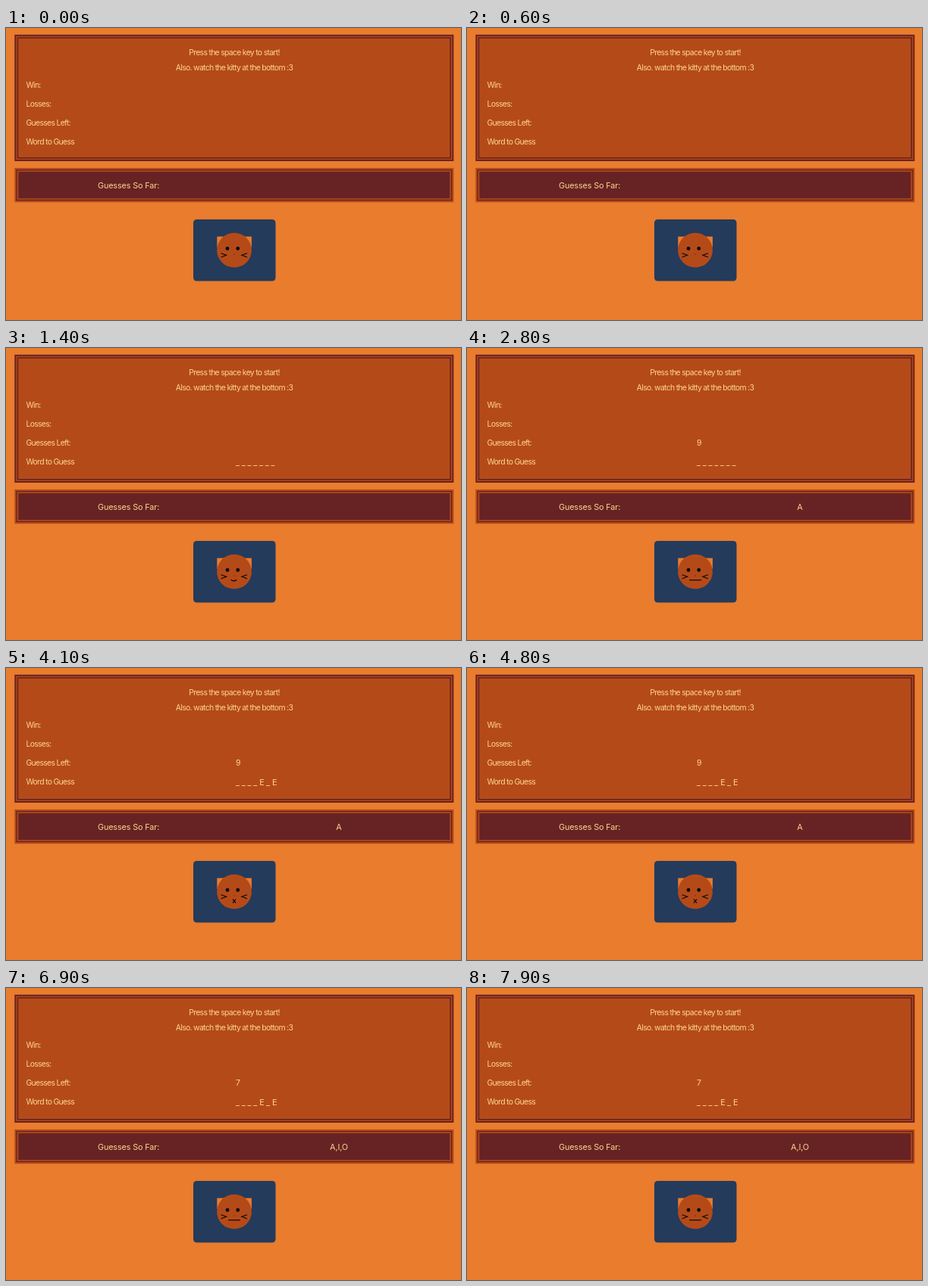
Write an HTML page that moves like this. It is 600 px wide and 386 px high and loops after 8000 ms.

```html
<!DOCTYPE html>
<html lang="en">
<head>
<meta charset="utf-8">
<title>Kitty word game</title>
<style>
  html, body { margin: 0; width: 100%; height: 100%; overflow: hidden; background: #e97c2d; }
  svg { display: block; width: 600px; height: 386px; }
  text { font: 10.4px Inter, sans-serif; letter-spacing: -.68px; fill: #fcd68c; }
  .mid { text-anchor: middle; }
  .wide { font-size: 10.8px; letter-spacing: -.12px; }
  .rust { fill: #b54a19; }
  .wine { fill: #672324; }
  .ink { fill: none; stroke: #0b0808; stroke-width: 1.2; }
</style>
</head>
<body>
<svg viewBox="0 0 600 386">
  <g id="board"></g>
  <text class="mid" x="301" y="36">Press the space key to start!</text>
  <text class="mid" x="301" y="56">Also. watch the kitty at the bottom :3</text>
  <text x="26.5" y="79">Win:</text>
  <text x="26.5" y="104">Losses:</text>
  <text x="26.5" y="129">Guesses Left:</text>
  <text x="26.5" y="153.5">Word to Guess</text>
  <text id="left" x="303" y="129"></text>
  <text id="word" class="wide" y="155.2"></text>

  <g id="lower">
    <g id="tray"></g>
    <text class="wide" x="121" y="212">Guesses So Far:</text>
    <text id="tried" class="wide mid" x="439" y="212"></text>
    <rect x="247" y="253" width="108.5" height="81.5" rx="4.5" fill="#243b5c"/>
    <rect x="278.3" y="275.7" width="45.6" height="14" fill="#e97c2d"/>
    <circle class="rust" cx="301" cy="293.7" r="22.9"/>
    <circle cx="292" cy="291.5" r="2.4" fill="#0b0808"/>
    <circle cx="305.7" cy="291.5" r="2.4" fill="#0b0808"/>
    <circle cx="301" cy="299" r=".8" fill="#7c2416"/>
    <path class="ink" d="M283.5 297.7L290.5 300.3L283.5 303M318 297.7L311 300.3L318 303"/>
    <path id="mouth" class="ink"/>
  </g>
</svg>
<script>
const LOOP = 8000;
const byId = id => document.getElementById(id);

const mouths = {
  none: '',
  smile: 'M296.8 304.2Q300.5 307.6 304 304.2',
  flat: 'M293 304.8H309',
  cross: 'M299 303.7L303 308.7M303 303.7L299 308.7'
};

const blank = '_______', found = '____E_E';
const steps = [
  { at: 0,    drop: 0, left: '',  word: '',    tried: '',      mouth: 'none' },
  { at: 1400, drop: 2, left: '',  word: blank, tried: '',      mouth: 'smile' },
  { at: 2800, drop: 2, left: '9', word: blank, tried: 'A',     mouth: 'flat' },
  { at: 4100, drop: 2, left: '9', word: found, tried: 'A',     mouth: 'cross' },
  { at: 5400, drop: 2, left: '8', word: found, tried: 'A,I',   mouth: 'flat' },
  { at: 6900, drop: 2, left: '7', word: found, tried: 'A,I,O', mouth: 'flat' }
];

// A panel with a double border: outer line, gap, inner line, fill.
function panel(y, height, line, fill) {
  return [0, 2, 3.4, 5].map((inset, i) =>
    `<rect class="${i % 2 ? fill : line}" x="${11.3 + inset}" y="${y + inset}"
      width="${579 - 2 * inset}" height="${height - 2 * inset}"/>`).join('');
}

// Letters are wider than blanks, so each one pushes the rest along.
function letterPositions(word) {
  let x = 303;
  return [...word].map(char => {
    const here = x + (char === '_' ? 0 : .3);
    x += char === '_' ? 7.75 : 9;
    return here;
  }).join(' ');
}

function show(step) {
  byId('board').innerHTML = panel(8.8, 167.2 + step.drop, 'wine', 'rust');
  byId('lower').setAttribute('transform', `translate(0 ${step.drop})`);
  byId('left').textContent = step.left;
  byId('word').setAttribute('x', letterPositions(step.word));
  byId('word').textContent = step.word;
  byId('tried').textContent = step.tried;
  byId('mouth').setAttribute('d', mouths[step.mouth]);
}

let current;
function tick() {
  const time = performance.now() % LOOP;
  const step = steps.findLast(s => s.at <= time);
  if (step !== current) show(current = step);
  requestAnimationFrame(tick);
}

byId('tray').innerHTML = panel(185, 45.3, 'rust', 'wine');
tick();
</script>
</body>
</html>
```
